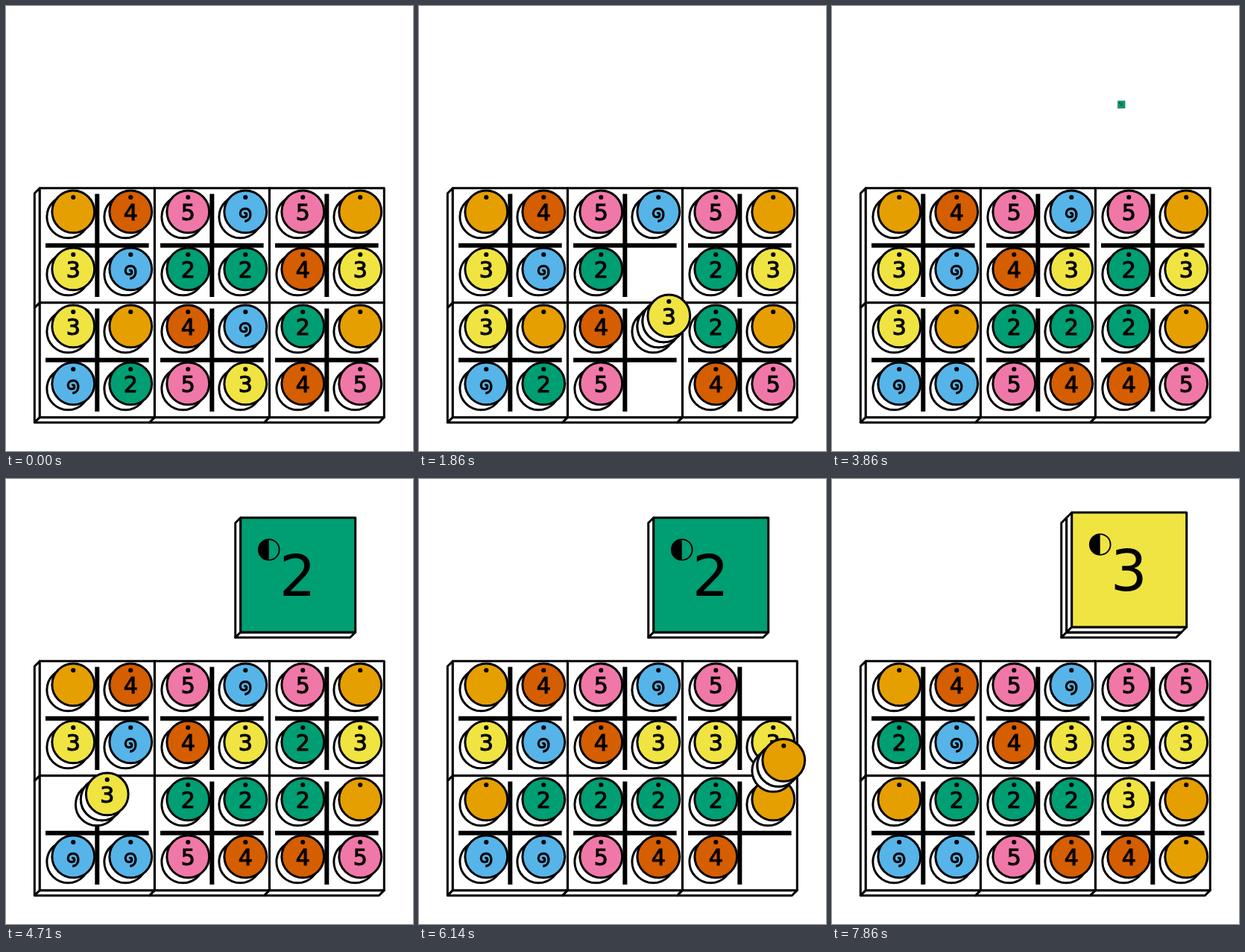
An HTML page that plays this animation: 546x598 px, repeating every 8 s.

```html
<!DOCTYPE html>
<html lang="en">
<head>
<meta charset="utf-8">
<title>Disc swaps</title>
<style>
  html, body { margin: 0; width: 100%; height: 100%; overflow: hidden; background: #fff; }
  svg { display: block; width: 546px; height: 598px; }
  .line { stroke: #000; stroke-width: 3; stroke-linejoin: round; }
  .cross { stroke: #000; stroke-width: 6; }
  text { font-family: "DejaVu Sans", sans-serif; text-anchor: middle; }
  .num { font-size: 30px; stroke: #000; stroke-width: 1.1; }
  .big { font-size: 77px; }
</style>
</head>
<body>
<svg viewBox="0 0 546 598">
  <g id="boards"></g>
  <g id="discs"></g>
  <g id="cards"></g>
</svg>
<script>
const LOOP = 8000, START = 1000, FPS = 7, STEPS = 5;
const SIDE = 154, CELL = 77, LIFT = 7, RADIUS = 28.4, TOUCH = 57;
const COLORS = ["#e69f00", "#56b4e9", "#009e73", "#f0e442", "#d55e00", "#f078a8"];
const LAYOUT = "045150" + "312243" + "304120" + "125345";

// A swap lists the upper disc's cell first; a card gives its number.
const EVENTS = [
  { swap: [9, 10] }, { swap: [21, 9] }, { swap: [8, 14] }, { swap: [15, 19] },
  { card: 2 },
  { swap: [12, 13] }, { swap: [10, 13] }, { swap: [5, 23] }, { swap: [16, 6] },
  { card: 3 }
];

const layer = id => document.getElementById(id);
const ease = u => u < 0.5 ? 4 * u ** 3 : 1 - 4 * (1 - u) ** 3;
const cellPos = i => ({ x: 90.25 + CELL * (i % 6), y: 276.4 + CELL * Math.floor(i / 6) });
const mix = (a, b, u) => ({ x: a.x + (b.x - a.x) * u, y: a.y + (b.y - a.y) * u });
const touches = (a, b) => Math.hypot(a.x - b.x, a.y - b.y) < TOUCH;

// Square slab whose left and bottom sides show.
function block(x, y, fill) {
  const s = SIDE, d = LIFT;
  return `<g class="line" fill="#fff">
    <path d="M${x} ${y}l${-d} ${d}v${s}l${d} ${-d}z"/>
    <path d="M${x} ${y + s}l${-d} ${d}h${s}l${d} ${-d}z"/>
    <rect x="${x}" y="${y}" width="${s}" height="${s}" fill="${fill}"/></g>`;
}

function board(x, y) {
  return block(x, y, "#fff") +
    `<path class="cross" d="M${x + CELL} ${y + 7.7}v138.6M${x + 7.7} ${y + CELL}h138.6"/>`;
}

function digit(n) {
  if (n === 0) return "";
  if (n > 1) return `<text class="num" y="11.4">${n}</text>`;
  return `<path fill="none" stroke="#000" stroke-width="3.2" d="M-1 13C5 12 7 7.500 6.600 3
    C6.200-2 3-4 0-4C-4.500-4-7-1.500-7 2.200C-7 5.500-5 7.300-2.500 7.300
    C0 7.300 1.500 6 1.500 4C1.500 2 0 1.500-2 2.200"/>`;
}

function disc(n, p, height = 0) {
  const d = LIFT;
  return `<g transform="translate(${p.x + d * height} ${p.y - d * height})">
    <circle class="line" cx="${-d}" cy="${d}" r="${RADIUS}" fill="#fff"/>
    <circle class="line" r="${RADIUS}" fill="${COLORS[n]}"/>
    <circle cy="-19.4" r="3.1"/>${digit(n)}</g>`;
}

function card(n, level, scale) {
  const x = 388.2 + LIFT * level, y = 132.5 - LIFT * level;
  return `<g transform="translate(${x} ${y}) scale(${scale}) translate(-73.5 -80.5)">
    ${block(0, 0, COLORS[n])}
    <circle cx="38" cy="43" r="13.9" fill="none" stroke="#000" stroke-width="1.9"/>
    <path d="M38 29a14 14 0 0 0 0 28z"/>
    <text class="big" x="76.5" y="105">${n}</text></g>`;
}

function drawDiscs(cells, swap, u) {
  const still = cells.map((n, i) => ({ n, p: cellPos(i) }))
    .filter((_, i) => !swap || !swap.includes(i));
  let out = still.map(d => disc(d.n, d.p)).join("");
  if (swap) {
    const [a, b] = swap;
    const upper = mix(cellPos(a), cellPos(b), u);
    const lower = mix(cellPos(b), cellPos(a), u);
    const rest = p => still.some(d => touches(d.p, p)) ? 1 : 0;
    const low = rest(lower);
    const high = touches(upper, lower) ? low + 1 : rest(upper);
    out += disc(cells[b], lower, low) + disc(cells[a], upper, high);
  }
  layer("discs").innerHTML = out;
}

function draw(step) {
  const cells = [...LAYOUT].map(Number);
  let moving = null, amount = 0, cards = "", level = 0;
  EVENTS.forEach((event, k) => {
    const phase = Math.min(4, step - k * STEPS + 1);
    if (phase < 1) return;
    const u = ease(phase / 4);
    if (event.card) {
      cards += card(event.card, level++, u);
    } else if (phase < 4) {
      moving = event.swap;
      amount = u;
    } else {
      const [a, b] = event.swap;
      [cells[a], cells[b]] = [cells[b], cells[a]];
    }
  });
  drawDiscs(cells, moving, amount);
  layer("cards").innerHTML = cards;
}

let boards = "";
for (let row = 0; row < 2; row++)
  for (let col = 2; col >= 0; col--)
    boards += board(45.3 + SIDE * col, 244.7 + SIDE * row);
layer("boards").innerHTML = boards;

let shown = null;
const origin = performance.now();
function tick() {
  const t = (performance.now() - origin) % LOOP;
  const step = Math.max(-1, Math.floor((t - START + 4.5) * FPS / 1000));
  if (step !== shown) draw(shown = step);
  requestAnimationFrame(tick);
}
tick();
</script>
</body>
</html>
```
